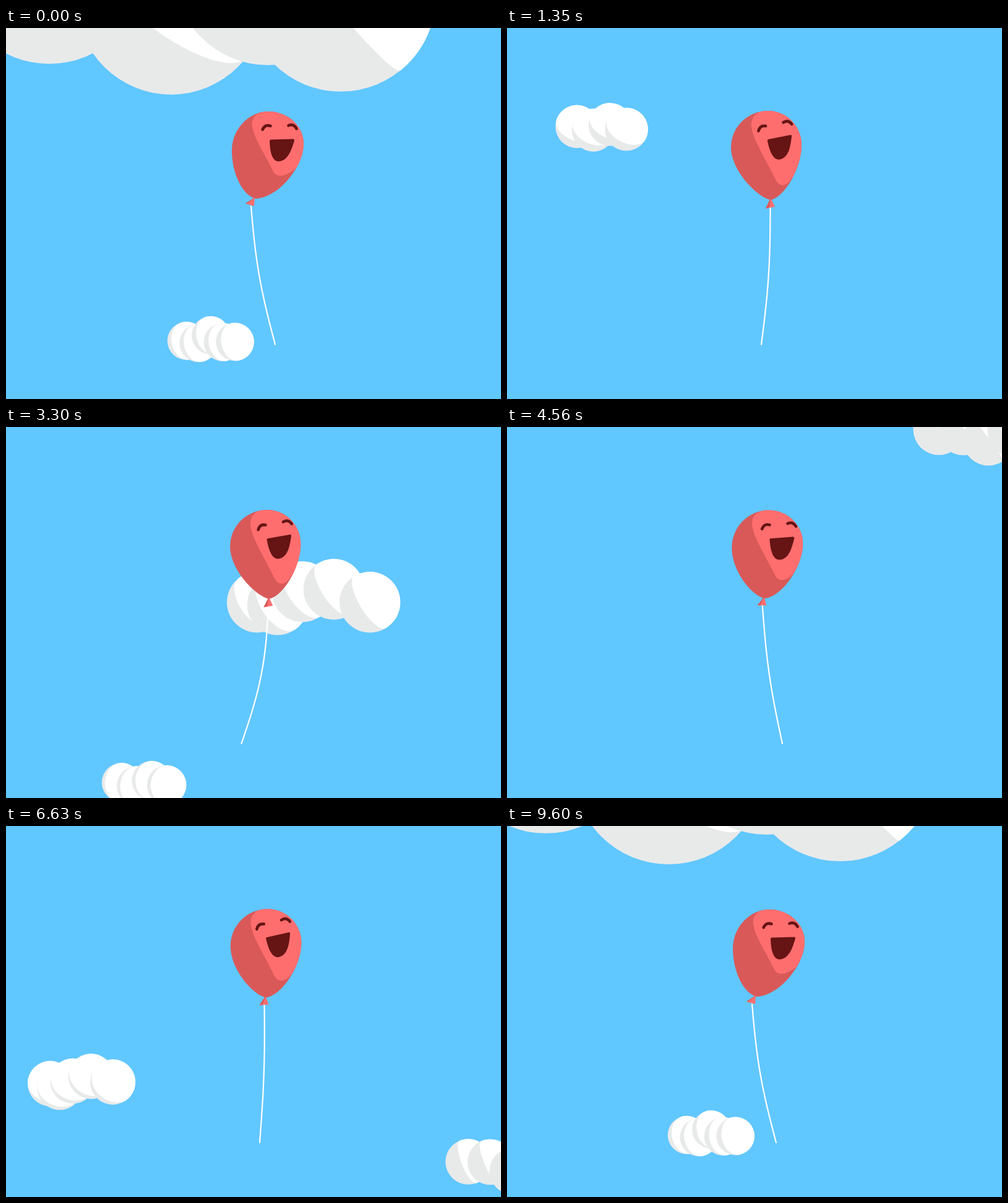
Write an HTML page with a canvas that moves like this. It is 800 by 600 pixels and loops after 9.63 s.

```html
<!DOCTYPE html>
<html lang="en">
<head>
<meta charset="utf-8">
<title>Happy balloon</title>
<style>
html, body { margin: 0; width: 100%; height: 100%; overflow: hidden; background: #61c7ff; }
canvas { display: block; }
</style>
</head>
<body>
<canvas id="stage" width="800" height="600"></canvas>
<script>
const ctx = document.getElementById('stage').getContext('2d');
const LOOP = 9630, STEP = 30;
const SKY = '#61c7ff', WHITE = '#ffffff', GREY = '#e8eaea';
const RED = '#ff6e6e', SHADE = '#d95959', DARK = '#661414';

// Directional light and the viewing distance used to shade the puffs
const LIGHT = { x: 0.52, y: 0.38, z: 0.58 }, FOCUS = 470;
// How fast a cloud recedes, relative to its speed
const RECEDE = 0.00021;

// Each cloud is at (x, y) at time "at" and moves by (vx, vy) per step.
// Its n puffs of radius r lie on a wave: span, skew, lift, phase, turn.
const clouds = [
  { at: 1350, x: 153, y: 161, vx: 1.18, vy: 7, r: 34.7, n: 4, span: 40, skew: 0, lift: 5, phase: -0.3, turn: 2.4 },
  { at: 3300, x: 497, y: 275, vx: 1.1, vy: 9.9, r: 49, n: 5, span: 91, skew: -18, lift: 15, phase: 0.6, turn: 1.57 },
  { at: 4560, x: 758, y: 10, vx: 0.69, vy: 8.8, r: 41.5, n: 4, span: 60, skew: 0, lift: 11, phase: -0.6, turn: -2 },
  { at: 6630, x: 122, y: 414, vx: 1.25, vy: 7.1, r: 36.5, n: 5, span: 50.5, skew: -14, lift: 9, phase: 0.3, turn: 1.5 },
  { at: 8280, x: 286.8, y: 211, vx: 1.04, vy: 6.95, r: 32.7, n: 5, span: 41.8, skew: 0, lift: 8, phase: 0.2, turn: 2.2 },
  { at: 0, x: 305.5, y: -70, vx: 5, vy: 47, r: 153, n: 4, span: 235.5, skew: 46, lift: 25, phase: -1.5, turn: 2.9, near: true }
];

// Pose keys, eased from one to the next around the loop
const poses = [
  { at: 0, lean: 1, nod: 0, tail: 435 },
  { at: 1350, lean: 0, nod: 1, tail: 411 },
  { at: 3300, lean: 0.05, nod: 0.85, tail: 380.5 },
  { at: 4560, lean: 0.43, nod: 0.3, tail: 445 },
  { at: 6630, lean: 0.27, nod: 1.15, tail: 410 },
  { at: 8280, lean: 0.07, nod: 0.88, tail: 388 }
];

function poseAt(t) {
  let i = poses.length - 1;
  while (poses[i].at > t) i--;
  const from = poses[i], to = poses[(i + 1) % poses.length];
  const u = (t - from.at) / ((to.at || LOOP) - from.at);
  const ease = (1 - Math.cos(Math.PI * u)) / 2;
  const between = key => from[key] + (to[key] - from[key]) * ease;
  return { lean: between('lean'), nod: between('nod'), tail: between('tail') };
}

function drawPuff(x, y, r) {
  if (x + r < 0 || x - r > 800 || y + r < 0 || y - r > 600) return;
  ctx.fillStyle = GREY;
  ctx.beginPath();
  ctx.arc(x, y, r, 0, 7);
  ctx.fill();

  // The view direction at this place decides how much of the lit side shows
  const size = Math.hypot(x - 400, 300 - y, FOCUS);
  const vx = (400 - x) / size, vy = (y - 300) / size;
  const facing = LIGHT.x * vx + LIGHT.y * vy + LIGHT.z * FOCUS / size;
  const turn = Math.atan2(facing * vy - LIGHT.y, LIGHT.x - facing * vx);
  const q = Math.PI / 2, rim = r + 0.3;
  ctx.fillStyle = WHITE;
  ctx.beginPath();
  ctx.arc(x, y, rim, turn - q, turn + q);
  ctx.ellipse(x, y, rim * Math.abs(facing), rim, turn, q, facing > 0 ? 3 * q : -q, facing < 0);
  ctx.fill();
}

function drawCloud(c, t) {
  const steps = ((t - c.at + LOOP * 1.5) % LOOP - LOOP / 2) / STEP;
  const depth = 1 + RECEDE * c.vy * steps;
  if (depth < 0.5) return;
  const cx = c.x + c.vx * steps / depth, cy = c.y + c.vy * steps / depth;
  for (let i = 0; i < c.n; i++) {
    const u = i / (c.n - 1);
    const dx = c.span * (2 * u - 1) + c.skew * Math.sin(Math.PI * u);
    const dy = c.lift * Math.sin(c.phase + c.turn * i);
    drawPuff(cx + dx / depth, cy + dy / depth, c.r / depth);
  }
}

function drawString(lean, tail) {
  const top = 290 - 2 * lean, knot = 425.5 - 29.5 * lean;
  const reach = tail - knot, bow = 1.5 - 0.2 * reach;
  ctx.beginPath();
  for (let s = 0; s <= 1.001; s += 0.04) {
    ctx.lineTo(knot + reach * s + bow * Math.sin(Math.PI * s), top + (512 - top) * s);
  }
  ctx.strokeStyle = WHITE;
  ctx.lineWidth = 2.2;
  ctx.stroke();
}

function triangle(x1, y1, x2, y2, x3, y3, color) {
  ctx.beginPath();
  ctx.moveTo(x1, y1);
  ctx.lineTo(x2, y2);
  ctx.lineTo(x3, y3);
  ctx.fillStyle = color;
  ctx.fill();
}

function drawKnot(lean) {
  const x = 426 - 24 * lean, y = 275 - lean;
  const footX = 418 - 31 * lean, footY = 292 - 8 * lean;
  triangle(x, y, footX, footY, 433 - 32 * lean, 289 - lean, RED);
  triangle(x, y, footX, footY, 424 - 34 * lean, 290.5 - 6.5 * lean, SHADE);
}

function drawBody(lean) {
  const tipX = 426 - 22 * lean, tipY = 278 - 2 * lean;
  const left = 362 + 3 * lean, leftY = 193 + 5 * lean;
  const right = 476 + 5 * lean, rightY = 189 - 2 * lean;
  const topX = 422 + 2 * lean, topY = 134 + lean;
  ctx.save();
  ctx.beginPath();
  ctx.moveTo(tipX, tipY);
  ctx.bezierCurveTo(tipX - 21, tipY - 4, left, leftY + 38, left, leftY);
  ctx.bezierCurveTo(left, leftY - 34, topX - 32, topY, topX, topY);
  ctx.bezierCurveTo(topX + 32, topY, right, rightY - 28, right, rightY);
  ctx.bezierCurveTo(right, rightY + 38, tipX + 22 + 14 * lean, tipY - 4 + 2 * lean, tipX, tipY);
  ctx.fillStyle = SHADE;
  ctx.fill();
  ctx.clip();

  // Lit side
  const edge = 395 + 3 * lean, edgeY = 160 - 2 * lean;
  const lowX = 436 - 3 * lean, lowY = 249 - 15 * lean;
  ctx.beginPath();
  ctx.moveTo(topX - 4 + 4 * lean, topY - 2);
  ctx.bezierCurveTo(edge + 3, topY + 3, edge - 1, edgeY - 12, edge, edgeY);
  ctx.bezierCurveTo(edge + 3, edgeY + 22, lowX - 16, lowY - 34, lowX, lowY);
  ctx.bezierCurveTo(lowX + 7, lowY + 8, lowX + 17, lowY + 7, 460 + 9 * lean, 242 - 15 * lean);
  ctx.lineTo(500, lowY);
  ctx.lineTo(500, 120);
  ctx.fillStyle = RED;
  ctx.fill();
  ctx.restore();
}

function drawFace(nod) {
  ctx.save();
  ctx.translate(446 - 6 * nod, 179.5 - 3.5 * nod);
  ctx.rotate(-0.024 - 0.176 * nod);
  ctx.strokeStyle = ctx.fillStyle = DARK;
  ctx.lineWidth = 4;
  ctx.beginPath();
  ctx.moveTo(-18, 2.5);
  ctx.lineTo(18, 2.5);
  ctx.bezierCurveTo(13, 18, 7, 34, -6, 34);
  ctx.bezierCurveTo(-16, 34, -18, 18, -18, 2.5);
  ctx.fill();
  ctx.stroke();
  ctx.lineWidth = 4.6;
  for (const side of [-1, 1]) {
    const eyeX = d => -3.5 + side * d;
    ctx.beginPath();
    ctx.moveTo(eyeX(27.5), -16);
    ctx.quadraticCurveTo(eyeX(23), -25, eyeX(14.5), -21.5);
    ctx.stroke();
  }
  ctx.restore();
}

function draw(now) {
  const t = Math.floor(now % LOOP / STEP) * STEP;
  const { lean, nod, tail } = poseAt(t);
  ctx.fillStyle = SKY;
  ctx.fillRect(0, 0, 800, 600);
  ctx.lineCap = ctx.lineJoin = 'round';
  for (const c of clouds) if (!c.near) drawCloud(c, t);
  drawString(lean, tail);
  drawKnot(lean);
  drawBody(lean);
  drawFace(nod);
  for (const c of clouds) if (c.near) drawCloud(c, t);
}

let start;
function tick(now) {
  if (start === undefined) start = now;
  draw(Math.max(0, now - start));
  requestAnimationFrame(tick);
}
requestAnimationFrame(tick);
</script>
</body>
</html>
```
